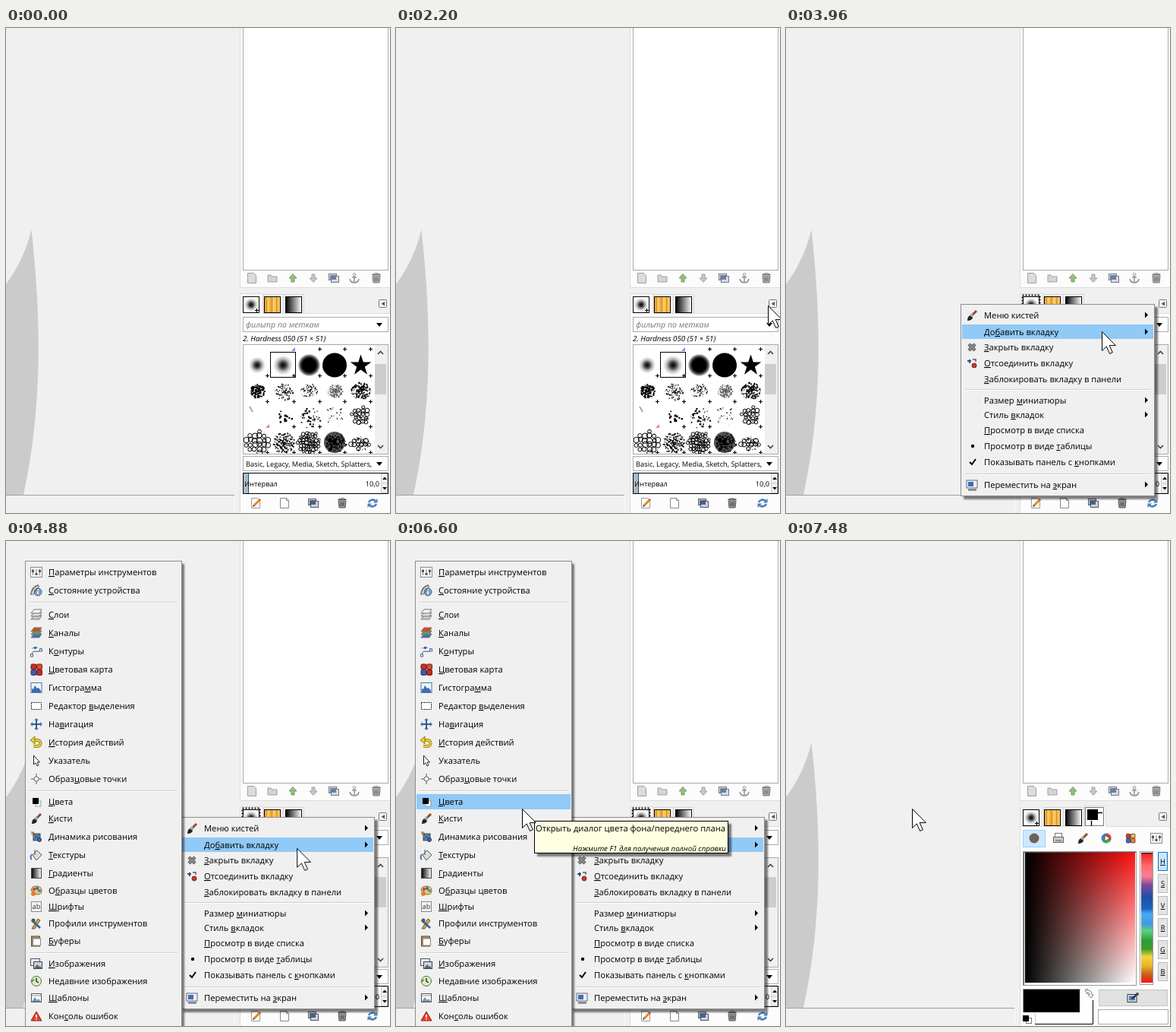
These frames come from a looping animation (506 by 638 pixels, 8 s). An HTML page:

```html
<!DOCTYPE html>
<html lang="ru">
<head>
<meta charset="utf-8">
<title>Панель кистей</title>
<style>
html, body { margin: 0; width: 506px; height: 638px; overflow: hidden; background: #f0f0f0; }
svg { display: block; }
text { font: 11.2px "Open Sans", "Noto Sans", sans-serif; text-rendering: geometricPrecision; white-space: pre; }
.small { font-size: 9.3px; }
.filter { font-size: 10.6px; font-style: italic; }
.note { font-size: 9.75px; font-style: italic; }
</style>
</head>
<body>
<svg id="stage" width="506" height="638" viewBox="0 0 506 638"></svg>
<script>
const LOOP = 8000;
const rect = (x, y, w, h, fill = 'none', stroke = 'none', more = '') =>
  `<rect x="${x}" y="${y}" width="${w}" height="${h}" fill="${fill}" stroke="${stroke}" ${more}/>`;
const path = (d, fill = 'none', stroke = 'none', w = 1) =>
  `<path d="${d}" fill="${fill}" stroke="${stroke}" stroke-width="${w}"/>`;
const disc = (x, y, r, fill = 'none', stroke = 'none') =>
  `<circle cx="${x}" cy="${y}" r="${r}" fill="${fill}" stroke="${stroke}"/>`;
const text = (x, y, s, cls = '', fill = '#000', anchor = 'start') =>
  `<text x="${x}" y="${y}" class="${cls}" fill="${fill}" text-anchor="${anchor}">` +
  s.replace(/_(.)/, '<tspan text-decoration="underline">$1</tspan>') + '</text>';
const at = (x, y, s) => `<g transform="translate(${x} ${y})">${s}</g>`;
const group = (id, s) => `<g id="${id}">${s}</g>`;
const fade = (a, s) => `<g opacity="${a}">${s}</g>`;
const ramp = (id, stops, attrs = '', tag = 'linearGradient') => `<${tag} id="${id}" ${attrs}>` +
  stops.map(([o, c, a = 1]) => `<stop offset="${o}" stop-color="${c}" stop-opacity="${a}"/>`).join('') + `</${tag}>`;
const shadow = (x, y, w, h) => rect(x + 4, y + 4, w, h, '#000', 'none', 'opacity=".5" filter="url(#blur)"');

let seed = 7;
const rnd = () => (seed = (seed * 16807) % 2147483647) / 2147483647;

const down = 'M-4 -2.5H4L0 2.5Z';
const vertical = 'x2="0" y2="1"';
const defs = '<defs><filter id="blur"><feGaussianBlur stdDeviation="1.3"/></filter>' +
  '<clipPath id="grid"><rect x="313" y="417" width="173" height="143"/></clipPath>' +
  ramp('soft', [[0, '#000'], [.3, '#000', .75], [.65, '#000', .25], [1, '#000', 0]], '', 'radialGradient') +
  ramp('firm', [[0, '#000'], [.6, '#000'], [.8, '#000', .65], [1, '#000', 0]], '', 'radialGradient') +
  ramp('gray', [[0, '#000'], [1, '#fff']]) +
  ramp('dark', [[0, '#000'], [1, '#000', 0]]) +
  ramp('wood', [[0, '#e79a35'], [.25, '#ffd05a'], [.4, '#e9a03c'], [.6, '#ffcf62'], [.8, '#f0ad45'], [1, '#ffd878']]) +
  ramp('sat', [[0, '#f11'], [1, '#fff']], vertical) +
  ramp('hue', [[0, '#f01c1c'], [.1, '#ff6a6a'], [.18, '#ff7d95'], [.25, '#7c4a9a'], [.34, '#1c4fa8'], [.43, '#1c63c0'],
    [.47, '#48a8f5'], [.55, '#4499e0'], [.6, '#5bd27c'], [.68, '#2f9a35'], [.74, '#3d9b30'], [.8, '#f3d33c'],
    [.87, '#e8b42c'], [.93, '#c8681c'], [1, '#f01818']], vertical) + '</defs>';

// Icons are centred on 0,0 and about 16 px wide
const sheet = 'M-5.5 -6.5H2.5L5.5 -3.5V6.5H-5.5Z';
const slab = (y, f) => path(`M-7 ${y}l4 -5h10l-3 5z`, f, '#777');
const brush = path('M-6 7Q-6 1 -2 0L1 3Q0 7 -6 7Z', '#222') + path('M-1 1L6 -6', 'none', '#8a4b35', 3) + path('M-2 1L1 -2', 'none', '#aaa', 3);
const pencil = path('M-3 3L4 -4', 'none', '#e08a20', 3) + path('M-5 5l1 -3 2 2z', '#333') + path('M4 -4l1 -1', 'none', '#d33', 3);
const sliders = rect(-7.5, -6.5, 15, 13, '#fafafa', '#888') + path('M-4.5 -4V4M0 -4V4M4.5 -4V4', 'none', '#777') +
  rect(-6, -3, 3, 3, '#555') + rect(-1.5, 1, 3, 3, '#555') + rect(3, -3, 3, 3, '#555');
const photo = rect(-7.5, -6.5, 12, 9, '#eee', '#555') + rect(-3.5, -2.5, 11, 9, '#c8d4e0', '#444') + path('M-3 6l4 -5 3 3 1 -1 2 3z', '#567');
const screen = rect(-7, -6, 14, 10, '#eef', '#667') + rect(-5, -4, 7, 6, '#3d6fae') + path('M-5 6.5H6', 'none', '#667', 2);
const tiles = (a, b, c, d) => rect(-7, -7, 7, 7, a, '#522', 'rx="1.5"') + rect(.5, -7, 7, 7, b, '#522', 'rx="1.5"') +
  rect(-7, .5, 7, 7, c, '#335', 'rx="1.5"') + rect(.5, .5, 7, 7, d, '#522', 'rx="1.5"');
const icon = {
  sliders, brush, photo, screen,
  device: path('M-7 6Q-6 -5 3 -7', 'none', '#777', 2) + disc(2, 2, 5, '#7d9fc8', '#567') + path('M2 1V5M2 -1.5V0', 'none', '#fff', 1.6) + path('M-5 6L4 -6', 'none', '#555'),
  layers: slab(6, '#ccc') + slab(2, '#ddd') + slab(-2, '#f4f4f4'),
  channels: slab(6, '#4668c8') + slab(2, '#4fa848') + slab(-2, '#e0402c'),
  curve: path('M-6 6C-6 -6 5 6 6 -4', 'none', '#333') + path('M-6 -4L2 -5', 'none', '#68a') + rect(-7.5, 4, 3, 3, '#fff', '#36a') + rect(4.5, -3, 3, 3, '#fff', '#36a') + rect(-3, -6, 3, 3, '#36a'),
  map: tiles('#d22b20', '#e24a2c', '#2e62b8', '#c8281e'),
  histogram: rect(-7, -6.5, 14, 13, '#eef4fb', '#4a74a8') + path('M-6 6V1l2 1 2 -5 3 4 2 -1 3 4V6Z', '#3c6eb0'),
  select: rect(-6.5, -4.5, 13, 9, '#fff', '#222', 'stroke-dasharray="2 1"'),
  move: path('M-5 0H5M0 -5V5', 'none', '#2d5c94', 2) + path('M0 -8l3 3h-6zM0 8l3 -3h-6zM-8 0l3 -3v6zM8 0l-3 -3v6z', '#3f78b5'),
  undo: path('M-3 -3H2A4 4 0 0 1 1 5H-4', 'none', '#8d7517', 4) + path('M-3 -3H2A4 4 0 0 1 1 5H-4', 'none', '#edd035', 2.4) + path('M-8 -3L-2 -8V2Z', '#edd035', '#8d7517'),
  pointer: path('M-3.5 -7V5L-1 3 1 7 3 6 1 2H4.5Z', '#fff', '#222'),
  points: disc(0, 0, 3, '#fff', '#666') + path('M0 -7V-3M0 3V7M-7 0H-3M3 0H7', 'none', '#555'),
  colors: rect(-1, -1, 7, 7, '#fff', '#999') + rect(-5, -5, 8, 8, '#000'),
  dynamics: rect(-4, -4, 9, 9, '#5f86b0', '#33506e') + path('M-7 -7l5 1 -4 4z', '#d27b24') + path('M-4 -4L5 5M-4 4L5 -4', 'none', '#2d4666') + disc(4, 4, 2.5, '#3f6fa5', '#234'),
  bucket: path('M-5 0L1 -6 7 0 0 7Z', '#ddd', '#555') + path('M-6 -1Q-9 4 -6 6', 'none', '#4a78b0', 2) + path('M-2 -7V0', 'none', '#555'),
  gradient: rect(-6.5, -6.5, 13, 13, 'url(#gray)', '#444'),
  palette: path('M-7 0Q-7 -6 0 -6T7 0Q7 5 2 5T-2 3T-7 0', '#e6c48c', '#864') + disc(-3, -2, 2, '#d33') + disc(1, -3, 2, '#36a') + disc(4, 0, 2, '#3a4') + disc(-4, 4, 3, '#d98424'),
  font: rect(-6.5, -6.5, 13, 13, '#f5f5f5', '#888') + text(0, 3, 'ab', 'small', '#333', 'middle'),
  presets: path('M-6 7L2 -6 5 -4 -2 7Z', '#d9a83e', '#654') + path('M-6 -4L5 6', 'none', '#3a68a0', 3) + disc(-4, -4, 2.5, '#555'),
  clipboard: rect(-6.5, -6, 11, 13, '#b98640', '#6b4a1e') + rect(-4.5, -3, 10, 9, '#fff', '#888') + rect(-3, -7, 5, 3, '#888'),
  clock: disc(0, 0, 6.5, '#dceccb', '#4c6f39') + path('M0 -4V0L3 2', 'none', '#333', 1.5) + path('M-7 1L-3 -2', 'none', '#5b9a3c', 2),
  template: rect(-6.5, -5.5, 13, 11, '#fff', '#555') + path('M-6 5l4 -6 3 4 2 -2 3 4z', '#7492b4') + path('M-6 -3H6', 'none', '#888'),
  warning: path('M0 -6L7 6H-7Z', '#e5402f', '#9b1c14') + path('M0 -2V2M0 3.5V5', 'none', '#fff', 1.6),
  cross: path('M-4 -4L4 4M-4 4L4 -4', 'none', '#555', 4.5) + path('M-4 -4L4 4M-4 4L4 -4', 'none', '#888', 2.5),
  detach: disc(3, 3, 3, '#c33b2c', '#722') + path('M-6 -3H-1M-3 -5V0', 'none', '#357', 2) + path('M1 -5h4v3', 'none', '#555', 1.5),
  dot: disc(1, 0, 2.2, '#000'),
  check: path('M-3 0L0 3 5 -4', 'none', '#000', 2),
  page: path(sheet, '#fff', '#888') + path('M2.5 -6.5V-3.5H5.5', 'none', '#888'),
  blank: path(sheet, '#d4d4d4', '#888'),
  folder: path('M-6 5V-4H-2L-1 -2H6V5Z', '#ccc', '#888'),
  up: path('M0 -5.5L5 0H2V5H-2V0H-5Z', '#7ab55c', '#4f7d3b'),
  down: path('M0 5.5L5 0H2V-5H-2V0H-5Z', '#bbb', '#888'),
  copy: rect(-6.5, -5.5, 10, 8, '#dde', '#556') + rect(-3.5, -2.5, 10, 8, '#ccd3e0', '#556') + rect(-5, -4, 8, 6, '#4a6285'),
  anchor: disc(0, -4.5, 1.8, 'none', '#777') + path('M0 -3V5M-6 1Q-5 6 0 6T6 1M-3 -1H3', 'none', '#777', 1.5),
  trash: path('M-5 -3H5L4 6H-4Z', '#999', '#555') + path('M-5.5 -4.5Q0 -8 5.5 -4.5Z', '#bbb', '#555') + path('M-2 -1V4M0 -1V4M2 -1V4', 'none', '#444'),
  edit: path(sheet, '#fff', '#999') + at(1, 0, pencil),
  refresh: path('M-5 -1A5.5 5 0 0 1 4 -3M5 1A5.5 5 0 0 1 -4 3', 'none', '#4f7fb8', 2.6) + path('M6.5 -6V-.5H1ZM-6.5 6V.5H-1Z', '#4f7fb8'),
  printer: rect(-4.5, -6.5, 9, 6, '#fff', '#777') + rect(-6.5, -1.5, 13, 7, '#ccc', '#666') + path('M-4 3H4', 'none', '#555'),
  wheel: disc(0, 0, 6.5, '#3b7fd0') + path('M0 0L0 -6.5A6.5 6.5 0 0 1 5.6 3.2Z', '#e33a2b') + path('M0 0L5.6 3.2A6.5 6.5 0 0 1 -5.6 3.2Z', '#4caf3f') + path('M-2 -4L5 0 -2 4Z', '#fff', '#555'),
};
const put = (name, x, y) => at(x, y, icon[name]);
const row = (y, list) => list.map(([n, x]) => put(n, x, y)).join('');

// Brush thumbnails
function splat(x, y, n, spread, size) {
  let d = '';
  while (n--) {
    const a = rnd() * 6.283, r = spread * Math.pow(rnd(), .7), s = (size * (.5 + rnd())).toFixed(1);
    d += `M${(x + r * Math.cos(a)).toFixed(1)} ${(y + r * Math.sin(a) * .9).toFixed(1)}h${s}v${s}h-${s}z`;
  }
  return path(d, '#000');
}
function cells(x, y, radius, step, flat = 1) {
  let s = '';
  for (let v = -radius; v <= radius; v += step)
    for (let u = -radius; u <= radius; u += step) {
      const px = u + rnd() * 2, py = v + rnd() * 2;
      if (Math.hypot(px, py / flat) < radius - 1) s += disc((x + px).toFixed(1), (y + py).toFixed(1), (step * (.4 + rnd() * .25)).toFixed(1), 'none', '#000');
    }
  return s;
}
const plus = (x, y) => path(`M${x - 2} ${y + .5}h5M${x + .5} ${y - 2}v5`, 'none', '#001', 1.2);
const star = Array.from({ length: 10 }, (_, i) => {
  const r = i % 2 ? 5.6 : 14.5, a = i * Math.PI / 5;
  return `${(467.5 + r * Math.sin(a)).toFixed(1)} ${(444 - r * Math.cos(a)).toFixed(1)}`;
}).join('L');
function thumbs() {
  let s = disc(331, 443.5, 11, 'url(#soft)') + disc(365, 443.5, 13, 'url(#soft)') + disc(399.5, 443.5, 15, 'url(#firm)') +
    disc(433, 443.5, 16, '#000') + path(`M${star}Z`, '#000') + rect(348.5, 426.5, 33, 33, 'none', '#000');
  s += splat(331, 477, 190, 10, 1.4) + splat(366, 478, 95, 12, 1.2) + splat(399, 477, 95, 11, 1) +
    fade(.65, splat(433, 477, 150, 10, 1.2)) + splat(467, 477, 190, 13, 1.3);
  s += path('M321 498l4 7', 'none', '#aaa', 2) + splat(367, 512, 14, 13, 2) + splat(400, 512, 38, 15, 1.8) +
    splat(433, 511, 24, 15, 1) + cells(467, 510, 13, 5) + splat(467, 510, 45, 13, .9);
  s += cells(331, 545, 16, 6) + splat(365, 545, 200, 15, 1.3) + cells(399, 545, 16, 4) + splat(399, 545, 110, 15, 1) +
    disc(433, 545, 14, '#555') + splat(433, 545, 170, 14, 1.6) + cells(467, 546, 14, 5, .6) + splat(467, 546, 45, 11, 1);
  for (const x of [344, 379, 413, 446, 480])
    for (const y of [422, 457, 491, 524, 558])
      if (!(y == 422 && x < 400) && !(y == 524 && (x == 344 || x == 446))) s += plus(x, y);
  return `<g clip-path="url(#grid)">${s}${path('M381 420v5h-5z', '#7a8cf0')}${path('M347 521v5h-5z', '#f08080')}</g>`;
}

const field = (y, h) => rect(312.5, y + .5, 191, h, '#fff', '#ababab');
const base = path('M33.5 265C45 370 50 490 23 614H0V337Q24 305 33.5 265Z', '#cbcbcb') +
  path('M0 614.5H301', 'none', '#a0a0a0') + path('M301.5 615V638', 'none', '#fafafa') +
  rect(309, 0, 197, 341, '#fcfcfc') + path('M308.5 0V341.5H506', 'none', '#dcdcdc') + rect(312.5, -1.5, 191, 320, '#fff', '#a9a9a9') +
  fade(.8, row(329, [['blank', 324], ['folder', 351], ['up', 378], ['down', 405], ['copy', 432], ['anchor', 459], ['trash', 488]])) +
  rect(309, 376, 197, 262, '#fcfcfc') + path('M308.5 349V638M309 375.5H506', 'none', '#dcdcdc');
const tabs = rect(339.5, 350.5, 53, 25, '#f0f0f0', '#d9d9d9') + path('M365.5 351V375', 'none', '#d9d9d9') +
  rect(312.5, 353.5, 21, 21, '#fff', '#000') + disc(323, 364, 9, 'url(#soft)') + plus(330, 371) +
  rect(340.5, 353.5, 21, 21, 'url(#wood)', '#000') + path('M343.5 354V374M350.5 354V374M356.5 354V374', 'none', '#b8741e', .6) +
  rect(368.5, 353.5, 21, 21, 'url(#gray)', '#000') + rect(491.5, 357.5, 10, 10, '#f4f4f4', '#777', 'rx="1"') + path('M499 360v5.5l-4.5 -2.75z', '#555');

const brushes = rect(309, 349, 30, 27, '#fcfcfc') + path('M309 349.5H338.5V375', 'none', '#d9d9d9') + tabs +
  field(380, 19) + text(316, 394, 'фильтр по меткам', 'filter', '#777') + at(492, 390.5, path(down, '#000')) +
  text(312, 412, '2. Hardness 050 (51 × 51)', 'note') +
  rect(312.5, 416.5, 191, 144, '#fff', '#a9a9a9') + thumbs() + rect(486, 417, 17, 143, '#f0f0f0') + rect(486, 442, 15, 40, '#cdcdcd') +
  path('M490 429l3.5 -3.5 3.5 3.5M490 549l3.5 3.5 3.5 -3.5', 'none', '#444', 1.6) +
  field(563, 19) + text(316, 577, 'Basic, Legacy, Media, Sketch, Splatters,', 'small') + at(492, 573.5, path(down, '#000')) +
  rect(312.5, 585.5, 191, 27, '#fff', '#000') + rect(313, 586, 7, 26, '#a9bccb') + path('M319.5 586V612', 'none', '#345') +
  text(314, 603, 'Интервал', 'small') + text(492, 603, '10,0', 'small', '#000', 'end') +
  rect(494.5, 586.5, 8, 25, '#f0f0f0', '#ccc') + path('M495 599H502', 'none', '#ccc') + path('M496 594h6l-3 -3.5zM496 604h6l-3 3.5z', '#000') +
  row(625, [['edit', 329], ['page', 367], ['copy', 405], ['trash', 443], ['refresh', 483]]);

const colors = rect(393, 349, 29, 27, '#fcfcfc') + path('M309 375.5H393.5V348.5H421.5V375.5', 'none', '#d9d9d9') + tabs +
  rect(402.5, 358.5, 14, 14, '#fff') + path('M411 357.5H417M402.5 368V375', 'none', '#000', 1.4) + rect(397, 353, 14, 14, '#000') +
  rect(394.5, 350.5, 24, 24, 'none', '#000', 'stroke-dasharray="1 1"') +
  rect(312.5, 380.5, 29, 22, '#cce8ff', '#99d1ff') + disc(327, 391, 6.5, '#6b645a') +
  row(391, [['printer', 359], ['brush', 391], ['wheel', 422], ['sliders', 488]]) +
  at(454, 391, `<g transform="scale(.8)">${tiles('#d33a2a', '#edc23a', '#3a6cc0', '#e08a2c')}</g>`) +
  rect(312.5, 408.5, 149, 176, '#fff', '#999') + rect(315, 410, 145, 171, 'url(#sat)') + rect(315, 410, 145, 171, 'url(#dark)') + path('M313.5 584V409.5H461', 'none', '#555') +
  rect(466.5, 408.5, 17, 175, '#fff', '#999') + rect(468, 410, 15, 171, 'url(#hue)') + path('M468 410.5H483', 'none', '#000') +
  [...'HSVRGB'].map((c, i) => rect(490.5, 409.5 + i * 29, 12, 24, i ? '#e4e4e4' : '#cce4f7', i ? '#bbb' : '#0078d7') + text(496.5, 425 + i * 29, '_' + c, 'small', '#000', 'middle')).join('') +
  rect(328, 604, 77, 32, '#fff') + path('M328 635.5H404.5V604', 'none', '#000') + path('M328.5 635V620', 'none', '#ccc') +
  rect(312, 589, 77, 32, '#fff') + rect(313, 590, 74, 30, '#000') + path('M312.5 620V589.5H388', 'none', '#999') +
  rect(316.5, 627.5, 7, 7, '#fff', '#777') + rect(312, 624, 8, 8, '#000') +
  path('M394 591l3 -2 0 2q6 0 6 6h2l-3 4 -4 -4h2q0 -3 -3 -3v2z', '#fff', '#777') +
  rect(412.5, 590.5, 90, 21, '#e1e1e1', '#c4c4c4') + at(457, 601, rect(-7, -4.5, 12, 10, '#dfe8f4', '#333') + rect(-5, -2.5, 8, 6, '#4d80be') + path('M-1 1L6 -5', 'none', '#222', 2) + disc(6, -5, 2, '#643')) +
  rect(411.5, 616.5, 92, 19, '#fff', '#ababab');

// Menus: [icon, label, centre y, has submenu]
const entry = x => ([name, label, y, sub]) => (name ? put(name, x - 16, y) : '') + text(x, y + 4, label) + (sub ? path(`M473 ${y - 4.5}v8l4 -4z`, '#000') : '');
const line = (x, y, w) => path(`M${x} ${y + .5}h${w}`, 'none', '#cfcfcf') + path(`M${x} ${y + 1.5}h${w}`, 'none', '#fff');
const box = (x, y, w, h) => rect(x + .5, y + .5, w - 1, h - 1, '#f0f0f0', '#8c8c8c');
const bar = (id, x, y, w, h) => rect(x, y, w, h, '#91c9f7', 'none', `id="${id}"`);

const menu = box(230, 363, 256, 253) + bar('barBrush', 232, 368, 252, 21) + bar('barAdd', 232, 390, 252, 19) + line(236, 475, 244) + line(236, 586, 244) + [
  ['brush', 'Меню кистей', 378, 1], ['', 'До_бавить вкладку', 400, 1], ['cross', '_Закрыть вкладку', 420],
  ['detach', '_Отсоединить вкладку', 441], ['', '_Заблокировать вкладку в панели', 462],
  ['', 'Размер _миниатюры', 490, 1], ['', 'Стиль _вкладок', 509, 1], ['', '_Просмотр в виде списка', 529],
  ['dot', 'Просмотр в виде _таблицы', 550], ['check', 'Показывать панель с _кнопками', 571], ['screen', 'Переместить на _экран', 601, 1],
].map(entry(261)).join('');

const dialogs = shadow(25, 26, 206, 620) + box(25, 26, 207, 620) + bar('barDyn', 27, 377, 203, 24) + bar('barPens', 27, 354, 203, 23) + bar('barColors', 27, 333, 203, 20) +
  [80, 328, 541].map(y => line(31, y, 195)).join('') + [
  ['sliders', '_Параметры инструментов', 41], ['device', '_Состояние устройства', 65],
  ['layers', '_Слои', 97], ['channels', '_Каналы', 121], ['curve', 'К_онтуры', 145], ['map', '_Цветовая карта', 169],
  ['histogram', 'Гистогра_мма', 193], ['select', 'Редактор _выделения', 217], ['move', 'На_вигация', 241],
  ['undo', '_История действий', 265], ['pointer', 'Указатель', 289], ['points', 'Образ_цовые точки', 313],
  ['colors', '_Цвета', 343], ['brush', '_Кисти', 365], ['dynamics', '_Динамика рисования', 389], ['bucket', '_Текстуры', 413],
  ['gradient', '_Градиенты', 437], ['palette', 'О_бразцы цветов', 460], ['font', '_Шрифты', 481],
  ['presets', 'Профили инструментов', 503], ['clipboard', '_Буферы', 526],
  ['photo', '_Изображения', 556], ['clock', 'Недавние изображения', 579], ['template', '_Шаблоны', 601], ['warning', 'Кон_соль ошибок', 625],
].map(entry(56)).join('');

const tip = (x, y, w, h) => rect(x + .5, y + .5, w - 1, h - 1, '#ffffe1', '#000');
stage.innerHTML = defs + base + group('brushes', brushes) + group('colors', colors) +
  group('focus', rect(311.5, 351.5, 23, 23, 'none', '#000', 'stroke-dasharray="2 2" stroke-width="2"')) +
  group('menuShade', shadow(230, 363, 256, 253)) + group('menu', menu) + group('dialogs', dialogs) +
  group('tipTab', tip(380, 381, 130, 22) + text(383, 396, 'Настроить эту вкладку')) +
  group('tipColors', shadow(182, 368, 256, 43) + tip(182, 368, 256, 43) + text(184, 382, 'Открыть диалог цвета фона/переднего плана') +
    text(435, 408, 'Нажмите F1 для получения полной справки', 'note', '#000', 'end')) +
  group('cursor', group('arrow', path('M.5 .5V25.5L6.3 20 10.5 29.5 14.3 27.8 10.2 18.6H18.3Z', '#fff', '#000')) +
    group('beam', path('M-3 -7.5H-1L.5 -6.5 2 -7.5H4M-3 7.5H-1L.5 6.5 2 7.5H4M.5 -7V7', 'none', '#000', 1.4)));

const timing = { duration: LOOP, iterations: Infinity };
// Alternating on and off times
const visible = {
  brushes: [0, 7480], colors: [7480], focus: [2920, 7480], menu: [2920, 7280], menuShade: [3000, 7280],
  barBrush: [3640, 3840], barAdd: [3840], dialogs: [4320, 7240], barDyn: [5180, 5440], barPens: [5440, 6040], barColors: [6040],
  tipTab: [2760, 2920], tipColors: [6600, 7240], arrow: [320, 1440, 1600], beam: [1440, 1600],
};
for (const [id, times] of Object.entries(visible)) {
  const frames = times.map((t, i) => ({ opacity: i % 2 ? 0 : 1, offset: t / LOOP, easing: 'step-end' }));
  if (times[0] > 0) frames.unshift({ opacity: 0, offset: 0, easing: 'step-end' });
  document.getElementById(id).animate([...frames, { opacity: 0, offset: 1 }], timing);
}
// Pointer: time, x, y, easing to the next stop
const moves = [
  [0, 20, 204, 'step-end'], [320, 20, 204, 'ease-in-out'], [1000, 251, 382], [1320, 251, 382, 'ease-in'], [1560, 437, 393, 'ease-out'],
  [1800, 487, 352, 'ease-in-out'], [2000, 492, 368, 'step-end'], [2200, 490, 365], [3480, 490, 365, 'ease-in-out'], [3960, 416, 399, 'step-end'],
  [4320, 398, 405], [4800, 398, 405, 'ease-in'], [5100, 260, 394], [5240, 197, 389, 'ease-out'], [5400, 171, 378, 'ease-out'], [5600, 169, 368, 'step-end'],
  [5680, 168, 367, 'step-end'], [5720, 167, 366], [5840, 167, 366, 'ease-in-out'], [6080, 166, 352], [8000, 166, 352],
];
document.getElementById('cursor').animate(moves.map(([t, x, y, easing = 'linear']) =>
  ({ transform: `translate(${x}px, ${y}px)`, offset: t / LOOP, easing })), timing);
</script>
</body>
</html>
```
